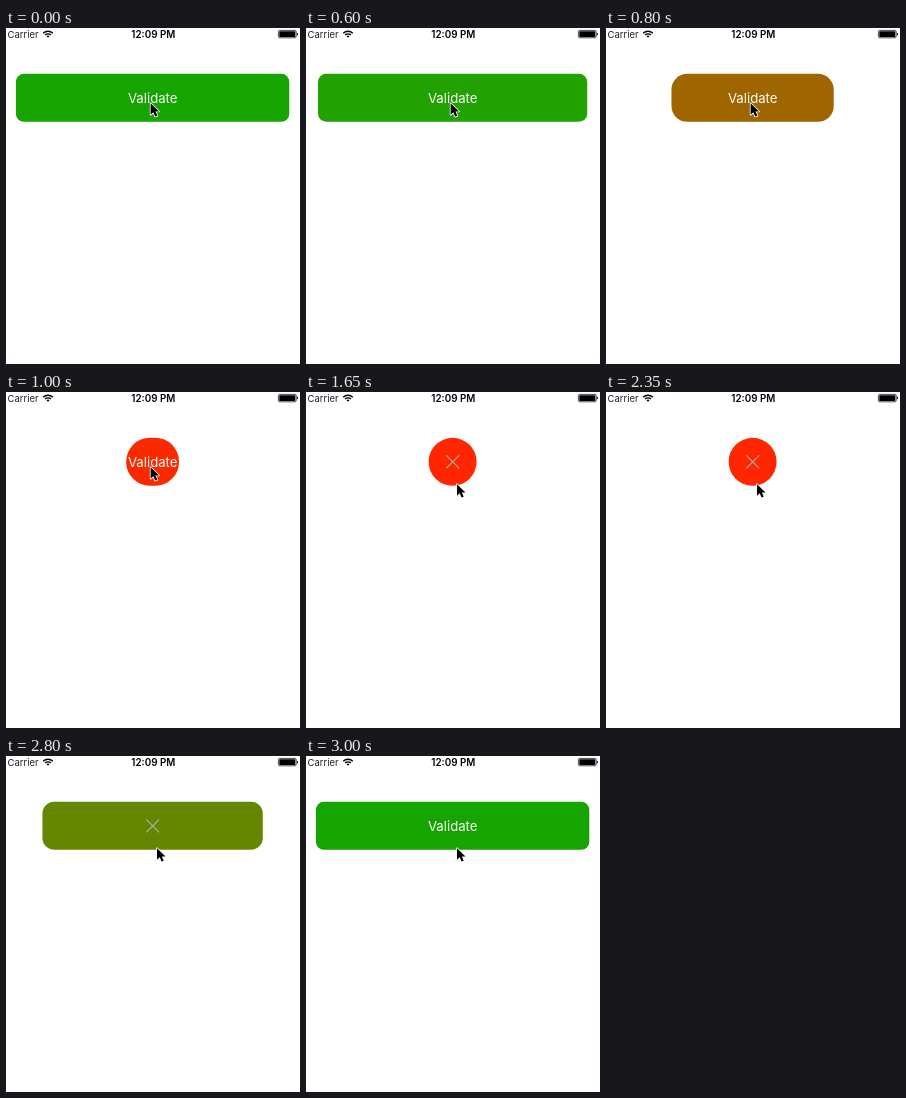
An HTML page for the animation above (3.5 s loop, 294x336 px).

```html
<!DOCTYPE html>
<html lang="en">
<head>
<meta charset="utf-8">
<title>Validate button</title>
<style>
  html, body { margin: 0; width: 100%; height: 100%; overflow: hidden; background: #fff; }
  svg { display: block; width: 294px; height: 336px; }
  text { font-family: Inter, "Liberation Sans", sans-serif; }
</style>
</head>
<body>
<svg viewBox="0 0 294 336">
  <g id="status">
    <text x="1.6" y="9.6" font-size="9.5" fill="#222">Carrier</text>
    <g transform="translate(42 9.8)" fill="none" stroke="#000" stroke-width="1.4">
      <path d="M-4.8-4.6A6.8 6.8 0 0 1 4.8-4.6M-2.9-2.7A4.1 4.1 0 0 1 2.9-2.7"/>
      <path d="M0 0L-1.5-1.5A2.1 2.1 0 0 1 1.5-1.5Z" fill="#000" stroke="none"/>
    </g>
    <text x="147.3" y="9.6" font-size="9.8" font-weight="600" text-anchor="middle">12:09 PM</text>
    <rect x="272.4" y="2.4" width="17.8" height="7.4" rx="1.3" fill="none" stroke="#000" stroke-width=".7"/>
    <rect x="273.3" y="3.2" width="16" height="5.8" rx=".6"/>
    <path d="M290.9 4.8q1.1 .3 1.1 1.3t-1.1 1.3z"/>
  </g>
  <rect id="button" y="45.8" height="48"/>
  <text id="label" x="146.7" y="74.6" font-size="13.2" fill="#fff" text-anchor="middle">Validate</text>
  <path id="cross" d="M140.2 63.4l13 13m0-13l-13 13" stroke="#b4b0a8" stroke-width="1.1"/>
  <path id="cursor" d="M0 0V11.6L2.7 9.1L4.6 13.4L6.7 12.5L4.9 8.3H8.5Z"
        stroke="#fff" stroke-width="1.6" stroke-linejoin="round" paint-order="stroke"/>
</svg>
<script>
  const LOOP = 3500, STEP = 50, MORPH = 500;
  const [button, label, cross, cursor] =
    ['button', 'label', 'cross', 'cursor'].map(id => document.getElementById(id));

  const clamp = v => Math.min(1, Math.max(0, v));
  const mix = (a, b, p) => a + (b - a) * p;

  // cubic-bezier(.42, 0, .58, 1), solved by bisection
  function easeInOut(x) {
    let lo = 0, hi = 1;
    for (let i = 0; i < 24; i++) {
      const s = (lo + hi) / 2, r = 1 - s;
      if (1.26 * r * r * s + 1.74 * r * s * s + s ** 3 < x) lo = s; else hi = s;
    }
    return lo * lo * (3 - 2 * lo);
  }

  // 0 = wide green button, 1 = red circle
  function collapse(t) {
    if (t < 600) return 0;
    if (t < 2550) return easeInOut(clamp((t - 552) / MORPH));
    return 1 - easeInOut(clamp((t - 2468) / MORPH));
  }

  function draw(t) {
    const p = collapse(t);
    const width = mix(273.4, 48, p);
    button.setAttribute('x', 146.6 - width / 2);
    button.setAttribute('width', width);
    button.setAttribute('rx', mix(8, 24, p));
    button.setAttribute('fill', `rgb(${mix(21, 255, p ** 0.75)}, ${mix(164, 38, p)}, 0)`);

    const failed = t >= 1100 && t < 3000;
    label.style.display = failed ? 'none' : '';
    cross.style.display = failed ? '' : 'none';

    const move = easeInOut(clamp((t - 1300) / 350));
    cursor.setAttribute('transform', `translate(${mix(144.6, 151, move)} ${mix(75.2, 92.2, move)})`);
  }

  function tick() {
    const t = performance.now() % LOOP;
    draw(Math.floor(t / STEP) * STEP);
    requestAnimationFrame(tick);
  }
  tick();
</script>
</body>
</html>
```
